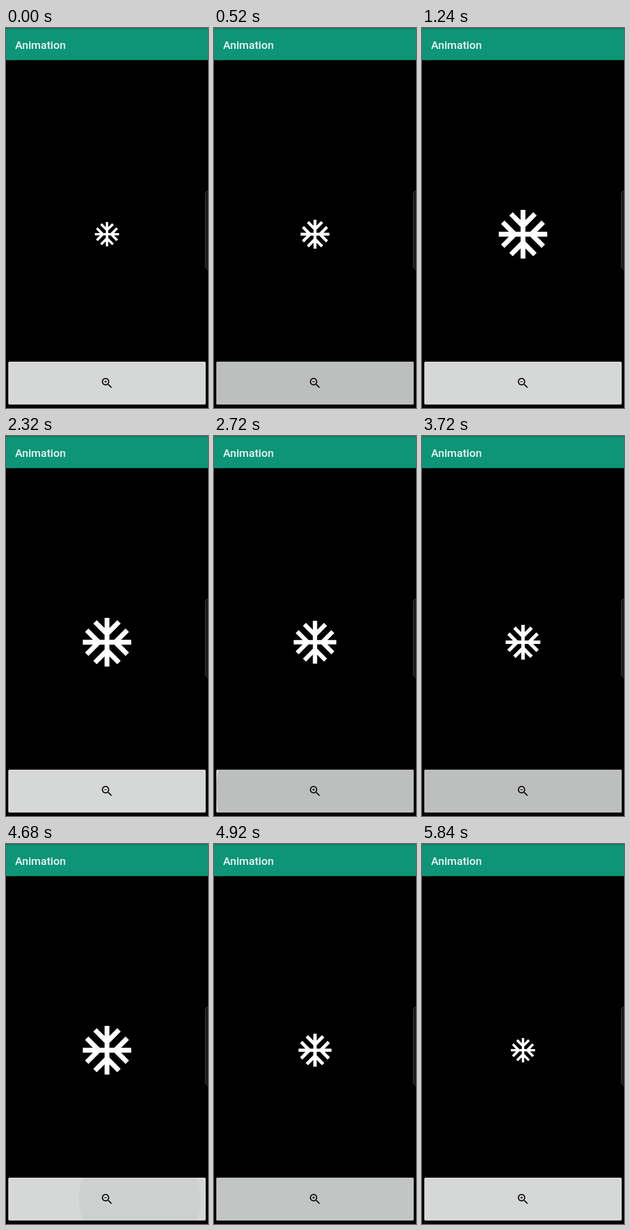
These frames come from a looping animation (350 by 656 pixels, 6040 ms). An HTML page:

```html
<!DOCTYPE html>
<html lang="en">
<head>
<meta charset="utf-8">
<title>Animation</title>
<style>
  html, body { margin: 0; width: 100%; height: 100%; overflow: hidden; background: #000; }
  svg { display: block; width: 350px; height: 656px; }
  .title { font: 500 19.2px Roboto, "Noto Sans", sans-serif; fill: #eef8f5; }
</style>
</head>
<body>
<svg viewBox="0 0 350 656">
  <defs>
    <clipPath id="button"><rect x="4" y="576" width="342" height="74" rx="2"/></clipPath>
  </defs>
  <rect width="350" height="656"/>
  <rect y="650" width="350" height="6" fill="#030408"/>

  <rect width="350" height="55.5" fill="#0e9577"/>
  <rect width="350" height="1.5" fill="#0b745d"/>
  <text class="title" x="15.7" y="36">Animation</text>

  <rect x="345.5" y="281.5" width="12" height="135" rx="5" fill="#17171c" stroke="#45454a"/>

  <g id="flake" fill="#fff">
    <path d="M22 11h-4.17l3.24-3.24-1.41-1.42L15 11h-2V9l4.66-4.66-1.42-1.41L13 6.17V2h-2v4.17L7.76 2.93 6.34 4.34 11 9v2H9L4.34 6.34 2.93 7.76 6.17 11H2v2h4.17l-3.24 3.24 1.41 1.42L9 13h2v2l-4.66 4.66 1.42 1.41L11 17.83V22h2v-4.17l3.24 3.24 1.42-1.41L13 15v-2h2l4.66 4.66 1.41-1.42L17.83 13H22z" transform="scale(2.1) translate(-12 -12)"/>
  </g>

  <g clip-path="url(#button)">
    <rect x="4" y="576" width="342" height="74" fill="#d6d7d7"/>
    <circle id="ripple" cy="613" fill="#bdbebe"/>
  </g>
  <g transform="translate(163 601)" fill="#111">
    <path d="M15.5 14h-.79l-.28-.27C15.41 12.59 16 11.11 16 9.5 16 5.91 13.09 3 9.5 3S3 5.91 3 9.5 5.91 16 9.5 16c1.61 0 3.09-.59 4.23-1.57l.27.28v.79l5 4.99L20.49 19l-4.99-5zm-6 0C7.01 14 5 11.99 5 9.5S7.01 5 9.5 5 14 7.01 14 9.5 11.99 14 9.5 14z"/>
    <rect x="7" y="9" width="5" height="1"/>
    <rect id="plus" x="9" y="7" width="1" height="5"/>
  </g>
</svg>
<script>
  const LOOP = 6040, STEP = 40, SCALE_TIME = 300;
  const ENTER = 225, FADE_IN = 75, FADE_OUT = 150;
  const START_RADIUS = 103, END_RADIUS = 175, CENTER = 175;
  const taps = [
    { down: 320, click: 434, x: 215 },
    { down: 2545, click: 2622, x: 222 },
    { down: 3505, click: 3583, x: 228 },
    { down: 4655, click: 4743, x: 234 }
  ];
  const flake = document.getElementById("flake");
  const ripple = document.getElementById("ripple");
  const plus = document.getElementById("plus");

  const clamp = v => Math.min(1, Math.max(0, v));
  const mix = (a, b, k) => a + (b - a) * k;
  const easeInOut = k => (1 - Math.cos(Math.PI * k)) / 2;

  // cubic-bezier(.4, 0, .2, 1)
  function fastOutSlowIn(x) {
    let lo = 0, hi = 1;
    for (let i = 0; i < 20; i++) {
      const s = (lo + hi) / 2, r = 1 - s;
      if (1.2 * r * r * s + 0.6 * r * s * s + s ** 3 < x) lo = s; else hi = s;
    }
    return 3 * (1 - lo) * lo * lo + lo ** 3;
  }

  function draw(now) {
    const t = Math.floor((now % LOOP) / STEP) * STEP;

    let scale = 1;
    taps.forEach((tap, i) => {
      const k = easeInOut(clamp((t - tap.click) / SCALE_TIME));
      scale += i % 2 ? -k : k;
    });
    flake.setAttribute("transform", `translate(175 356) scale(${scale})`);

    const clicks = taps.filter(tap => t >= tap.click).length;
    plus.setAttribute("visibility", clicks % 2 ? "hidden" : "visible");

    const tap = taps.filter(p => t >= p.down).pop();
    let opacity = 0;
    if (tap) {
      const age = t - tap.down;
      const k = fastOutSlowIn(clamp(age / ENTER));
      ripple.setAttribute("cx", mix(tap.x, CENTER, k));
      ripple.setAttribute("r", mix(START_RADIUS, END_RADIUS, k));
      opacity = clamp(age / FADE_IN) * (1 - clamp((age - ENTER) / FADE_OUT));
    }
    ripple.setAttribute("opacity", opacity);
  }

  function tick(now) {
    draw(now);
    requestAnimationFrame(tick);
  }
  draw(0);
  requestAnimationFrame(tick);
</script>
</body>
</html>
```
